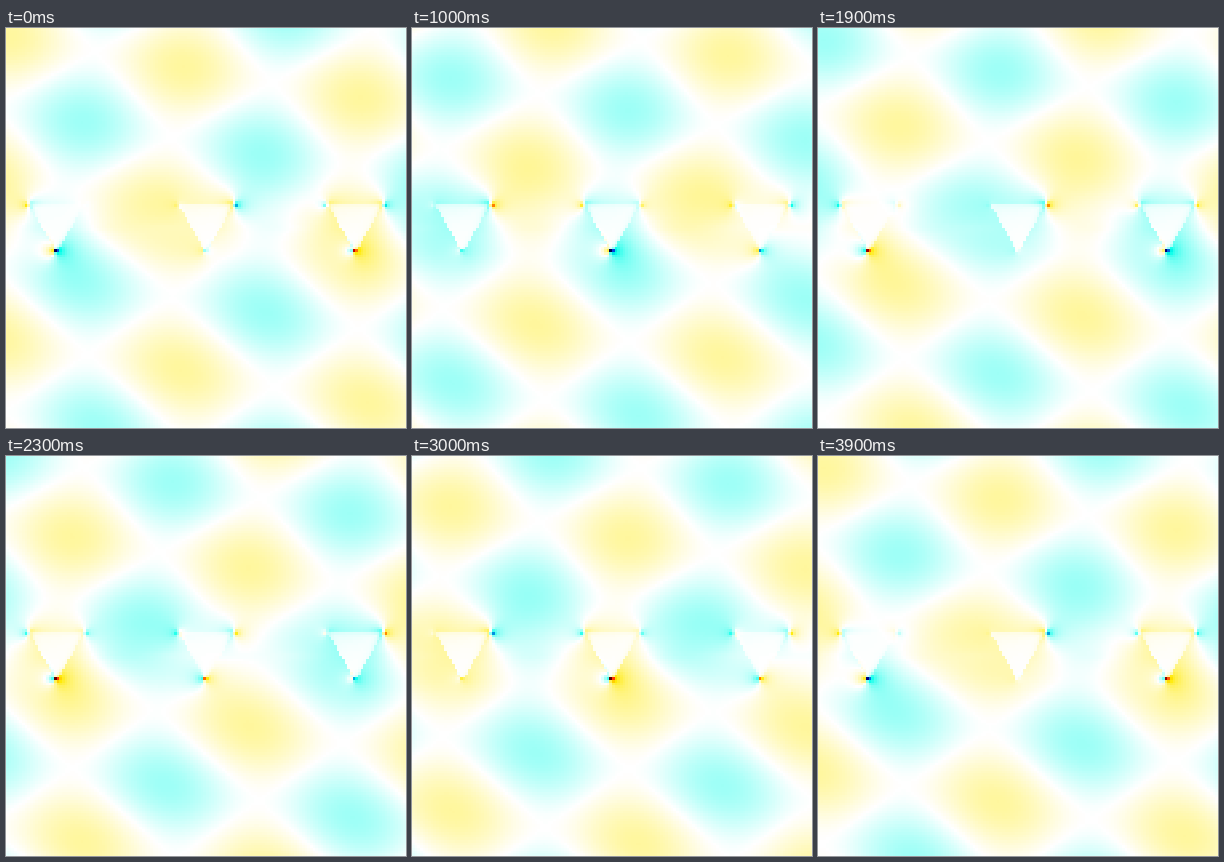
A matplotlib script for the animation above (4 s loop, 400 by 400 pixels).

```python
import numpy as np
import matplotlib.pyplot as plt
from matplotlib.animation import FuncAnimation
from matplotlib.colors import ListedColormap

SIZE, CELLS, FRAMES = 400, 150, 40
CELL = SIZE / CELLS
PITCH = 56 * CELL              # spacing of the triangles
GRATING = 2 * np.pi / PITCH
KX = 0.0076                    # horizontal wavenumber of the incoming wave
KY = -0.0434
TOP, BOTTOM, HALF = 175, 225, 28.5
MIDDLE = (TOP + BOTTOM) / 2
AMPLITUDE = 0.063

axis = (np.arange(CELLS) + 0.5) * CELL
X, Y = np.meshgrid(axis, axis)


def plane(kx, ky, x0, y0):
    return np.exp(1j * (kx * (X - x0) + ky * (Y - y0)))


def smoothstep(u):
    u = np.clip(u, 0, 1)
    return u * u * (3 - 2 * u)


def travelling_waves():
    """Two diffraction orders on each side, plus one bound to the row."""
    above = plane(KX, KY, 178, 39) + plane(KX - GRATING, -0.006, 178, 39)
    below = plane(KX, KY, 175, 342) + plane(KX - GRATING, 0.0045, 175, 342)
    mix = smoothstep((Y - TOP + 5) / 60)
    bound = plane(KX + GRATING, 0, 95, 0) * np.exp(-np.abs(Y - MIDDLE) / 25)
    return AMPLITUDE * (above * (1 - mix) + below * mix + 0.5 * bound)


def triangle_distance(cx):
    """Signed distance to a downward triangle, negative inside."""
    height = BOTTOM - TOP
    side = (height * (np.abs(X - cx) - HALF) + HALF * (Y - TOP)) / np.hypot(height, HALF)
    return np.maximum(TOP - Y, side)


def corner(x0, y0, side, strength, phase):
    """Field of a sharp corner: odd in x with a bright core."""
    dx = X - x0
    r = np.hypot(dx, Y - y0) + 0.3
    halo = 0.58 * (CELL / np.maximum(r, CELL)) ** 0.8 * np.exp(-r / 30)
    core = 0.6 * np.exp(-(r / 2) ** 2)
    return strength * np.exp(1j * phase) * (side * dx / r * halo + core)


def build_field():
    waves = travelling_waves()
    near = np.zeros_like(waves)
    dist = np.full(X.shape, np.inf)
    for m in range(-1, 4):
        cx = 19 * CELL + m * PITCH
        shift = KX * PITCH * m
        dist = np.minimum(dist, triangle_distance(cx))
        near += corner(cx - 1.5, BOTTOM - 2.3, 1, 1.0, shift - 2.95)
        near += corner(cx + HALF, TOP + 2, 1, 0.8, shift + 1.6)
        near += corner(cx - HALF, TOP + 2, -1, 0.5, shift + 0.19)

    # inside a triangle only a faint tint survives
    inside = dist < 0
    waves *= np.where(inside, 0.4 * np.exp((TOP - Y) / 12), 1)
    near *= np.exp(np.minimum(dist, 0) / 2.5)
    return waves + near


def make_cmap(n=1025):
    """White to yellow, red, black upwards; cyan, blue, black downwards."""
    v = np.linspace(-1, 1, n)
    s = np.abs(v)
    low, mid, high = (np.clip(k - 3 * s, 0, 1) for k in (1, 2, 3))
    tint = 1 - 0.25 * s
    warm = np.column_stack([high, mid * tint, low])
    cool = np.column_stack([low, mid, high * tint])
    return ListedColormap(np.where(v[:, None] > 0, warm, cool))


field = build_field()

fig = plt.figure(figsize=(4, 4), dpi=100)
ax = fig.add_axes([0, 0, 1, 1])
ax.axis("off")
image = ax.imshow(field.real, cmap=make_cmap(), vmin=-1, vmax=1,
                  interpolation="nearest", aspect="auto")


def update(i):
    image.set_data((field * np.exp(-2j * np.pi * i / FRAMES)).real)
    return (image,)


anim = FuncAnimation(fig, update, frames=FRAMES, interval=1000 * 4 // FRAMES, repeat=True)
plt.show()
```
